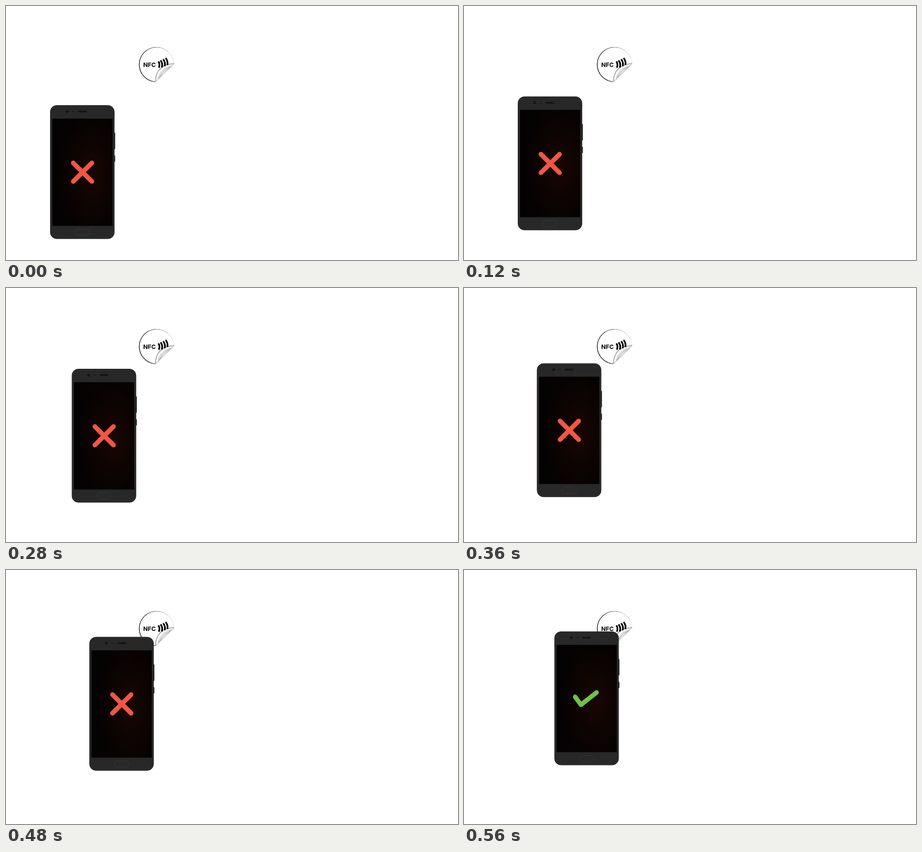
Animation of 933x525 px, one loop 0.96 s. Source, as an HTML page:

```html
<!DOCTYPE html>
<html lang="en">
<head>
<meta charset="utf-8">
<title>Phone and NFC tag</title>
<style>
  html, body { margin: 0; width: 100%; height: 100%; overflow: hidden; background: #fff; }
  svg { display: block; width: 100vw; height: 100vh; }
  text { font: 700 12.3px Inter, Roboto, sans-serif; }
</style>
</head>
<body>
<svg viewBox="0 0 933 525">
  <defs>
    <radialGradient id="glow" cx="0.66" cy="0.52" r="0.62">
      <stop offset="0" stop-color="#190603"/>
      <stop offset="0.5" stop-color="#0d0402"/>
      <stop offset="1" stop-color="#040202"/>
    </radialGradient>
    <clipPath id="peel"><path d="M347 119A36.4 36.4 0 1 0 308 157.3Z"/></clipPath>
  </defs>

  <g id="tag">
    <g clip-path="url(#peel)">
      <circle cx="310.4" cy="121.2" r="36.4" fill="#000"/>
      <circle cx="311.2" cy="120.8" r="35.6" fill="#fff"/>
    </g>
    <path d="M347 119C327 120 309 130 308 157Z" fill="#fff"/>
    <g fill="none" stroke="#aaa">
      <path d="M346.5 119C326 120.500 309 130 308.500 156.500" stroke-width="2"/>
      <path d="M342 123.500C328 126 317 136 313.500 151.500"/>
      <path d="M340 126C329 129 320 138 316 149.500" stroke="#777"/>
      <path d="M338 128.500C330 132 323 139 319 146.500"/>
      <path d="M346.800 119.500L308.500 157" stroke="#888" stroke-width=".7"/>
    </g>
    <text x="283.300" y="125.500">NFC</text>
    <g fill="none" stroke="#000" stroke-width="3.500">
      <path d="M314.500 114.500Q318.500 120 315.500 127.500"/>
      <path d="M319 112.500Q324.500 119 321.500 127"/>
      <path d="M324.300 110Q330 117 327.300 124.500"/>
      <path d="M329.500 107.500Q335 114.500 333 122"/>
    </g>
  </g>

  <g id="phone">
    <path d="M132 57h1.500q.8 0 .8 1v32q0 1-.8 1H132zM132 104h1.500q.8 0 .8 1v11q0 1-.8 1H132z" fill="#1c1c1c"/>
    <rect x=".5" y=".5" width="132" height="275.500" rx="13" fill="#282828" stroke="#202020"/>
    <rect x="2" y="2" width="129" height="272.500" rx="11.500" fill="none" stroke="#303030" stroke-width=".8"/>
    <g fill="#151515">
      <circle cx="35" cy="13" r="3"/>
      <circle cx="47.500" cy="13" r="1.400"/>
      <rect x="58" y="11" width="17.500" height="4" rx="1.500"/>
    </g>
    <rect x="4.500" y="27.700" width="124.500" height="221.800" fill="url(#glow)"/>
    <rect x="51.500" y="256.500" width="30" height="12.500" rx="5.500" fill="none" stroke="#363636"/>
    <g fill="none" stroke-linecap="round" stroke-linejoin="round">
      <path id="cross" d="M47.800 119.300l38.400 38.400M86.200 119.300l-38.400 38.400" stroke="#f15743" stroke-width="9.600"/>
      <path id="check" d="M43 135.200L55 151.500L87 126.200" stroke="#72c04a" stroke-width="9.400"/>
    </g>
  </g>
</svg>
<script>
  const LOOP = 960, STEP = 40, LAST = 14;
  // step, x, y of the phone's corner
  const path = [
    [0, 91, 205], [3, 111, 187], [5, 123, 177.5], [7, 135.7, 167],
    [10, 157.8, 150], [12, 172, 138.3], [LAST, 186.5, 127]
  ];
  const phone = document.getElementById('phone');
  const cross = document.getElementById('cross');
  const check = document.getElementById('check');

  function place(step) {
    const i = Math.max(1, path.findIndex(p => p[0] >= step));
    const a = path[i - 1], b = path[i];
    const k = (step - a[0]) / (b[0] - a[0]);
    return [a[1] + (b[1] - a[1]) * k, a[2] + (b[2] - a[2]) * k];
  }

  function draw(ms) {
    const step = Math.min(LAST, Math.floor((ms % LOOP) / STEP));
    const done = step === LAST;
    phone.setAttribute('transform', `translate(${place(step)})`);
    cross.setAttribute('visibility', done ? 'hidden' : 'visible');
    check.setAttribute('visibility', done ? 'visible' : 'hidden');
  }

  const start = performance.now();
  function tick() {
    draw(performance.now() - start);
    requestAnimationFrame(tick);
  }
  tick();
</script>
</body>
</html>
```
